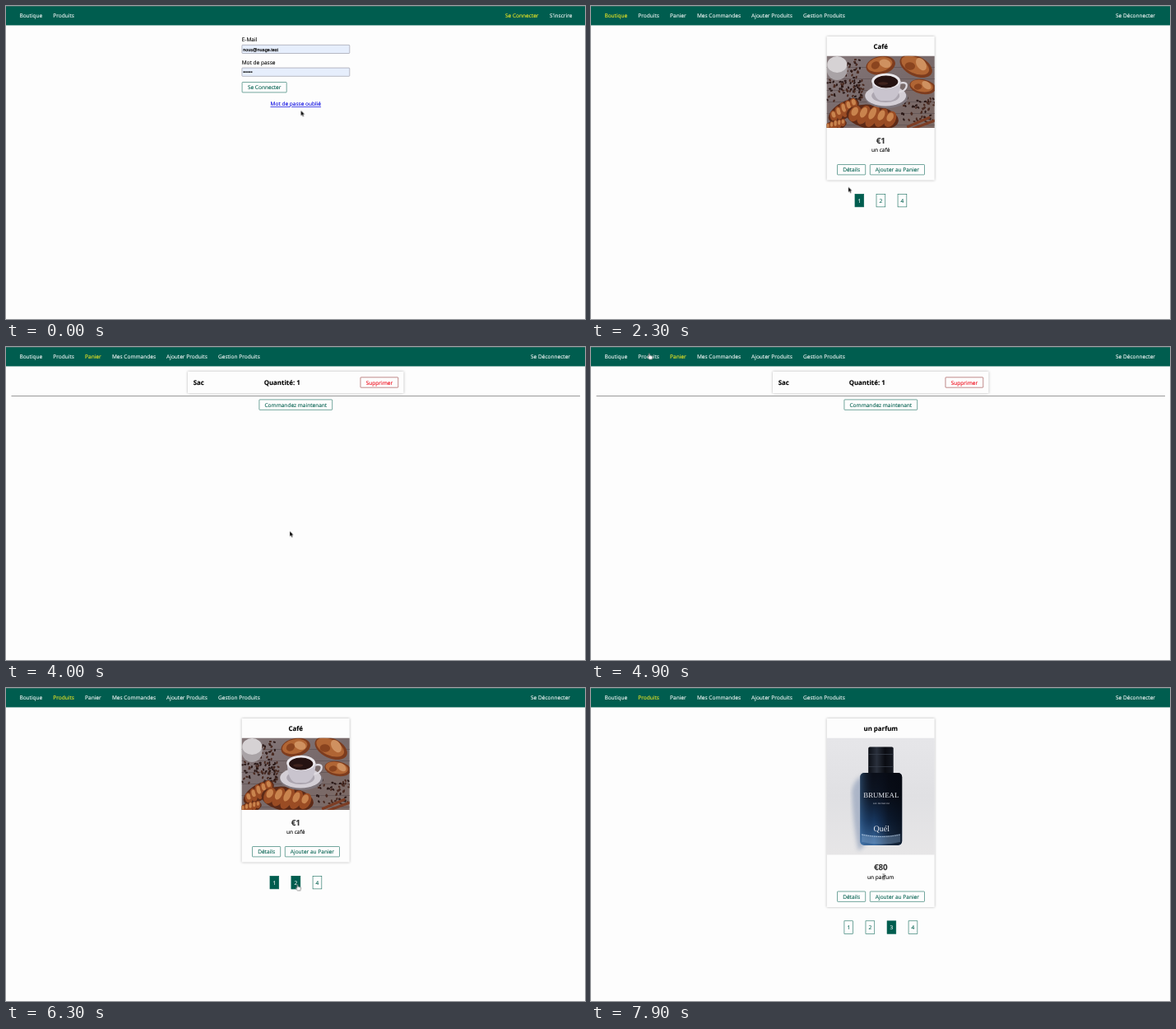
These frames come from a looping animation (704x380 px, 8 s). An HTML page:

```html
<!DOCTYPE html>
<html lang="fr">
<head>
<meta charset="utf-8">
<title>Boutique</title>
<style>
html, body { margin: 0; width: 100%; height: 100%; overflow: hidden; background: #fdfdfd; }
svg { display: block; width: 704px; height: 380px; }
text {
  font: 6.55px "Open Sans", "Noto Sans", sans-serif;
  text-rendering: geometricPrecision;
  stroke: currentColor; stroke-width: .1px; fill: currentColor;
  white-space: pre;
}
.mid { text-anchor: middle; }
.end { text-anchor: end; }
.h1 { font-size: 7.86px; font-weight: 700; }
.h2 { font-size: 9.8px; font-weight: 700; color: #383838; }
.nav { color: #fff; }
.nav.on { color: #f7ec22; }
.link { color: #0000e0; text-decoration: underline; }
.sys { font-family: "Liberation Sans", Arial, sans-serif; font-size: 5.46px; stroke-width: .18px; }
.serif { font-family: "Liberation Serif", serif; color: #e8eaf0; stroke: none; }
.btn rect { fill: #fdfdfd; stroke: #00604f; stroke-width: .55px; }
.btn text { color: #00604f; }
.btn.full rect { fill: #005d4f; stroke: #005d4f; }
.btn.full text { color: #fff; }
.btn.danger rect { stroke: #8c2a2a; }
.btn.danger text { color: #f00012; }
.field { fill: #e6eefc; stroke: #8d8f9c; stroke-width: .6px; }
.card { fill: #fdfdfd; filter: drop-shadow(0 .8px 1.6px rgba(0, 0, 0, .3)); }

#cursor { animation: move 8s ease-in-out infinite; }
@keyframes move {
  0%, .7% { transform: translate(358.5px, 126.8px); }
  7.4%, 14.4% { transform: translate(308px, 98px); }
  18.75% { transform: translate(305.8px, 136px); }
  25.2% { transform: translate(257px, 93px); }
  28.75% { transform: translate(312.8px, 219.6px); }
  36.25%, 38% { transform: translate(347.6px, 234px); }
  39.8%, 40.3% { transform: translate(351.2px, 234.4px); }
  46.25%, 48% { transform: translate(366px, 240px); }
  58.75% { transform: translate(71px, 9px); }
  60.5%, 68% { transform: translate(70.6px, 7.6px); }
  78.5%, 80.2% { transform: translate(354.2px, 238.4px); }
  82.4%, 84.5% { transform: translate(377px, 240.5px); }
  95%, 100% { transform: translate(355.8px, 229.3px); }
}
</style>
</head>
<body>
<script>
const LOOP = 8000;
let css = '', count = 0;

// Group that is seen only inside the given [from, to] spans (ms)
function show(spans, content) {
  const name = 'w' + count++;
  const pct = ms => (ms / LOOP * 100).toFixed(3) + '%';
  let steps = spans[0][0] > 0 ? '0% { opacity: 0 }' : '';
  for (const [from, to] of spans) {
    steps += `${pct(from)} { opacity: 1 }`;
    steps += to < LOOP ? `${pct(to)} { opacity: 0 }` : '100% { opacity: 1 }';
  }
  css += `@keyframes ${name} { ${steps} } .${name} { animation: ${name} 8s step-end infinite; }\n`;
  return `<g class="${name}">${content}</g>`;
}

const text = (x, y, s, cls = '') => `<text x="${x}" y="${y}" class="${cls}">${s}</text>`;
const rect = (x, y, w, h, attrs = '') => `<rect x="${x}" y="${y}" width="${w}" height="${h}" ${attrs}/>`;
const oval = (x, y, rx, ry, fill, turn = 0) =>
  `<ellipse cx="${x}" cy="${y}" rx="${rx}" ry="${ry}" fill="${fill}" transform="rotate(${turn} ${x} ${y})"/>`;
const path = (d, attrs) => `<path d="${d}" ${attrs}/>`;
const move = (dy, content) => `<g transform="translate(0 ${dy})">${content}</g>`;

function button(x, y, w, label, cls = '', h = 12.4, round = .7) {
  return `<g class="btn ${cls}">${rect(x, y, w, h, `rx="${round}"`)}` +
    `${text(x + w / 2, y + h / 2 + 2.5, label, 'mid')}</g>`;
}

function nav(active, member = true) {
  const cls = s => 'nav' + (s === active ? ' on' : '');
  const left = [['Boutique', 16.4], ['Produits', 57.3]];
  if (member) left.push(['Panier', 96.1], ['Mes Commandes', 128.9], ['Ajouter Produits', 195.1], ['Gestion Produits', 258]);
  const items = left.map(([s, x]) => text(x, 14.3, s, cls(s))).join('');
  return items + (member
    ? text(686, 14.3, 'Se Déconnecter', 'nav end')
    : text(607, 14.3, 'Se Connecter', cls('Se Connecter')) + text(688.4, 14.3, "S'inscrire", 'nav end'));
}

const pageLink = (i, n, label, full) =>
  button(352.4 + (i - (n - 1) / 2) * 26.05 - 5.4, 228.3, 10.8, label, full ? 'full' : '', 15.6, 0);
const addButton = cls => button(339.3, 192.5, 66.2, 'Ajouter au Panier', cls);

// Everything below the picture shifts with the picture's height
function product({ title, price, desc, height, picture, pages, current, hover = '' }) {
  const dy = height - 87.3;
  return rect(286.7, 37, 131, 174.5 + dy, 'class="card"') +
    text(352.3, 51.5, title, 'mid h1') +
    `<svg x="286.7" y="60.7" width="131" height="${height}" viewBox="286.5 60.7 131 ${height}">${picture}</svg>` +
    move(dy, text(352.3, 166.9, price, 'mid h2') + text(352.2, 177, desc, 'mid') +
      button(299.5, 192.5, 34.2, 'Détails') + addButton('') +
      pages.map((p, i) => pageLink(i, pages.length, p, p === current)).join('') + hover);
}

let seed = 7;
const rnd = () => (seed = seed * 16807 % 2147483647) / 2147483647;

function beans(n, x, y, w, h) {
  let out = '';
  while (n--) out += oval(x + rnd() * w, y + rnd() * h, 1.7, 1.1, rnd() < .5 ? '#2b1917' : '#4a2b22', rnd() * 180);
  return out;
}

function croissant(x, y, r, turn) {
  let out = oval(x, y + 1, r, r * .46, '#5d2a17', turn);
  for (let i = -2; i <= 2; i++) {
    const a = turn * Math.PI / 180, d = i * r * .34;
    const px = x + d * Math.cos(a), py = y + d * Math.sin(a), ry = r * (.44 - Math.abs(i) * .06);
    out += oval(px, py, r * .21, ry, '#9a4c24', turn + 18) + oval(px, py - ry * .25, r * .12, ry * .55, '#c9844e', turn + 18);
  }
  return out;
}

function pastry(x, y, rx, ry, turn) {
  return oval(x, y, rx, ry, '#7d3c1e', turn) + oval(x - 1, y - 1, rx * .86, ry * .8, '#b06534', turn) +
    oval(x + rx * .3, y - ry * .2, rx * .4, ry * .45, '#cf9160', turn + 30) + oval(x - rx * .35, y, rx * .3, ry * .4, '#8a441f', turn - 20);
}

function coffeePicture() {
  let planks = '';
  for (let i = 0; i < 6; i++) planks += rect(286, 74 + i * 14, 132, .7, 'fill="#5f5254"');
  return rect(286, 60, 132, 89, 'fill="url(#wood)"') + planks +
    beans(85, 287, 90, 44, 26) + beans(55, 376, 111, 42, 32) + beans(25, 309, 64, 18, 24) +
    oval(299, 77, 12.5, 13, '#a9a3a6') + oval(299, 71, 12, 10, '#d6d2d4') +
    pastry(352, 72, 18, 11, -12) + pastry(395, 73, 21, 12, 25) + pastry(403, 98, 16, 9, 10) +
    croissant(307, 126, 21, -32) + croissant(342, 134, 32, 9) + croissant(297, 144, 14, -15) +
    path('M384 147 412 135M391 149 418 139', 'stroke="#7c3d24" stroke-width="3"') +
    oval(359, 111, 26, 13, '#7f777d') + oval(358, 109, 25, 12.5, '#d3ced5') + oval(358, 109, 17, 8, '#aca6b0') +
    path('M374 94q12-3 9 5-3 6-11 5', 'fill="none" stroke="#dedae0" stroke-width="2.2"') +
    path('M341.5 91q1 22 11 24h12q11-3 12-24z', 'fill="#c9c4ce"') +
    oval(358.5, 91, 17.5, 9.3, '#ebe8ec') + oval(358.5, 92, 14.6, 7.4, '#251211') + oval(355, 94, 6, 1.8, '#3f221c');
}

function bagPicture() {
  let stones = '';
  for (let i = 0; i < 6; i++) {
    stones += path(`M286 ${42 + i * 27}l132 ${34 - i * 3}M${310 + i * 24} 60l${-34 + i * 6} 132`, 'stroke="#4a586c" stroke-width="1" opacity=".55"');
  }
  return rect(286, 60, 132, 132, 'fill="url(#stone)"') +
    path('M286 158l42 34H286z', 'fill="#8d8980"') +
    path('M346 60h72v50l-30-14-28-20z', 'fill="#91908c" opacity=".8"') +
    path('M368 192l20-20 30-14v34z', 'fill="#a09482" opacity=".85"') + stones +
    path('M392 110l20 16-4 34-38 30z', 'fill="#3d4f6b" opacity=".7"') +
    path('M303 119C297 88 306 66 321 67.500s24 22 27 44', 'fill="none" stroke="#141a26" stroke-width="3.4"') +
    path('M286 92l15-8 66 12q21 4 25 28 2 20-8 42-8 18-21 24-24-3-43-14-19-12-34-26z', 'fill="url(#hide)"') +
    path('M286 93l15-8 64 11-10 7-69-1z', 'fill="#2c374a"') +
    path('M362 98q-14 36-2 90', 'fill="none" stroke="#323d50" stroke-width="1"') +
    path('M296 122q26 10 54 6l-1 22q-28 2-52-7z', 'fill="#232d3f"') +
    path('M368 104q19 16 14 52', 'fill="none" stroke="#2f3a4d" stroke-width="3"') +
    path('M306 122C303 91 312 75 325 79s20 22 21 40', 'fill="none" stroke="#20293a" stroke-width="3.4"') +
    oval(378, 137, 3, 5, '#0a0e16');
}

function perfumePicture() {
  return rect(286, 60, 132, 143, 'fill="url(#paper)"') +
    path('M317 125q3-17 18-20v83l-10 10q-7-34-8-73z', 'fill="#8e9db8" opacity=".65" filter="url(#soft)"') +
    rect(337, 71.5, 30.5, 33, 'rx="2" fill="url(#cap)"') +
    rect(337, 80, 30.5, .7, 'fill="#3c4250"') + rect(337, 95, 30.5, .7, 'fill="#3c4250"') +
    rect(327, 103, 51, 88, 'rx="5" fill="url(#glass)"') +
    rect(327, 103, 51, 88, 'rx="5" fill="url(#shine)"') +
    path('M329 177q24 5 47 0v10q-23 5-47 0z', 'fill="#8fb2d8" opacity=".35"') +
    path('M329 178q24 5 47 0', 'fill="none" stroke="#d5e4f4" stroke-width=".8" stroke-dasharray="1.5 1"') +
    `<text x="352.6" y="133.2" class="serif mid" style="font-size:8.8px">BRUMEAL</text>` +
    `<text x="352.6" y="140.8" class="serif mid" style="font-size:2.5px">EAU DE PARFUM</text>` +
    `<text x="353" y="174" class="serif mid" style="font-size:10px">Quél</text>`;
}

const coffee = { title: 'Café', price: '€1', desc: 'un café', height: 87.3, picture: coffeePicture(), pages: [1, 2, 4], current: 1 };
const bag = { title: 'Sac', price: '€55', desc: 'un sac', height: 131, picture: bagPicture(), pages: [1, 2, 3, 4], current: 2 };
const tea = {
  title: 'Thé', price: '€3', desc: 'un thé', height: 87.3, pages: [1, 3, 4], current: 4,
  picture: rect(286, 60, 132, 89, 'fill="url(#paper)"') + oval(352, 108, 26, 11, '#c9c4bd') + oval(352, 103, 17, 8, '#a8763c')
};
const perfume = { title: 'un parfum', price: '€80', desc: 'un parfum', height: 141.8, picture: perfumePicture(), pages: [1, 2, 3, 4], current: 3 };

const mail = 'nous@nuage.test', dots = '••••••';
const login = nav('Se Connecter', false) +
  text(286.7, 43.4, 'E-Mail') + rect(286.9, 47.3, 130.9, 10.2, 'class="field" rx=".8"') +
  text(286.7, 71.3, 'Mot de passe') + rect(286.9, 75.1, 130.9, 10.2, 'class="field" rx=".8"') +
  show([[0, 790]], text(288.2, 55, mail, 'sys') + text(288.2, 82.3, dots, 'sys')) +
  show([[790, LOOP]], text(288.2, 54.9, mail) + text(288.2, 82.7, dots)) +
  button(287.1, 92.5, 54.1, 'Se Connecter') +
  show([[390, LOOP]], button(287.1, 92.5, 54.1, 'Se Connecter', 'full')) +
  text(352.3, 121.2, 'Mot de passe oublié', 'mid link');

const cart = nav('Panier') +
  show([[4990, LOOP]], text(57.3, 14.3, 'Produits', 'nav on')) +
  rect(221, 29.8, 262.5, 26.4, 'class="card"') +
  text(227.7, 46.4, 'Sac', 'h1') + text(335.7, 46.4, 'Quantité: 1', 'h1 mid') +
  button(431, 36.8, 45.8, 'Supprimer', 'danger') +
  rect(6.5, 59, 691.5, .9, 'fill="#8f8f8f"') +
  button(307.9, 63.9, 88.8, 'Commandez maintenant');

const pages = [
  [0, 1690, login],
  [1690, 3180, nav('Boutique') + product({ ...coffee, hover: show([[2980, LOOP]], pageLink(1, 3, 2, true)) })],
  [3180, 3890, nav('Boutique') + product({ ...bag, hover: addButton('full') })],
  [3890, 5490, cart],
  [5490, 6790, nav('Produits') + product({
    ...coffee,
    hover: show([[6270, 6490]], pageLink(1, 3, 2, true)) + show([[6580, LOOP]], pageLink(2, 3, 4, true))
  })],
  [6790, 7780, nav('Produits') + product({ ...tea, hover: show([[7500, LOOP]], pageLink(1, 3, 3, true)) })],
  [7780, LOOP, nav('Produits') + product(perfume)]
];

const arrow = path('M0 0v6.500l1.5-1.3 1 2.2 1.200-.5-1-2.200h2.100z', 'fill="#000" stroke="#fff" stroke-width=".4"');
const hand = path('M-.5.4q.6-.7 1.200 0v2.200l3 .7q.8.400.6 1.500l-.6 2.700H.2L-2 4.700q0-1 .9-.6l.6.500z',
  'fill="#fff" stroke="#333" stroke-width=".5"');
const beam = path('M-1.5-3.4q1.5 0 1.5.8 0-.8 1.5-.8M0-2.6v5.2M-1.5 3.4q1.5 0 1.5-.8 0 .8 1.5.8M-.9.7h1.8',
  'fill="none" stroke="#222" stroke-width=".6"');
const cursor = `<g id="cursor">` +
  show([[0, 390], [1230, 2980], [3960, 4720], [5530, 6260], [6840, 7500]], arrow) +
  show([[390, 1230], [2980, 3960], [4720, 5530], [6260, 6840], [7500, 7780]], hand) +
  show([[7780, LOOP]], beam) + '</g>';

const gradient = (id, dir, ...colors) => `<linearGradient id="${id}" ${dir}>` +
  colors.map((c, i) => `<stop offset="${i / (colors.length - 1)}" stop-color="${c}"/>`).join('') + '</linearGradient>';
const down = 'x2="0" y2="1"', across = 'x2="1" y2="0"', slant = 'x2="1" y2="1"';
const defs = '<defs>' +
  gradient('wood', slant, '#85787a', '#786a6b', '#7d6a64') +
  gradient('stone', slant, '#56657c', '#637796', '#7c8695') +
  gradient('hide', slant, '#1d2637', '#161d2b', '#0f141e') +
  gradient('paper', down, '#e6e6e9', '#e0e0e3', '#e7e6e7') +
  gradient('cap', across, '#0b0e15', '#2a303c', '#0a0c12', '#171b24') +
  gradient('glass', down, '#0a0e18', '#0d1625', '#173760', '#3d6ea4') +
  gradient('shine', across, '#4f86bd66', '#0a102000', '#05081099', '#050810cc') +
  '<filter id="soft"><feGaussianBlur stdDeviation="2.5"/></filter></defs>';

const stage = '<svg viewBox="0 0 704 380" xmlns="http://www.w3.org/2000/svg">' + defs +
  rect(0, 0, 704, 380, 'fill="#fdfdfd"') + rect(0, 0, 704, 23.45, 'fill="#005d4f"') + rect(0, 0, 704, .7, 'fill="#3b6f68"') +
  pages.map(([from, to, content]) => show([[from, to]], content)).join('') + cursor + '</svg>';

document.head.insertAdjacentHTML('beforeend', `<style>${css}</style>`);
document.body.insertAdjacentHTML('beforeend', stage);
</script>
</body>
</html>
```
